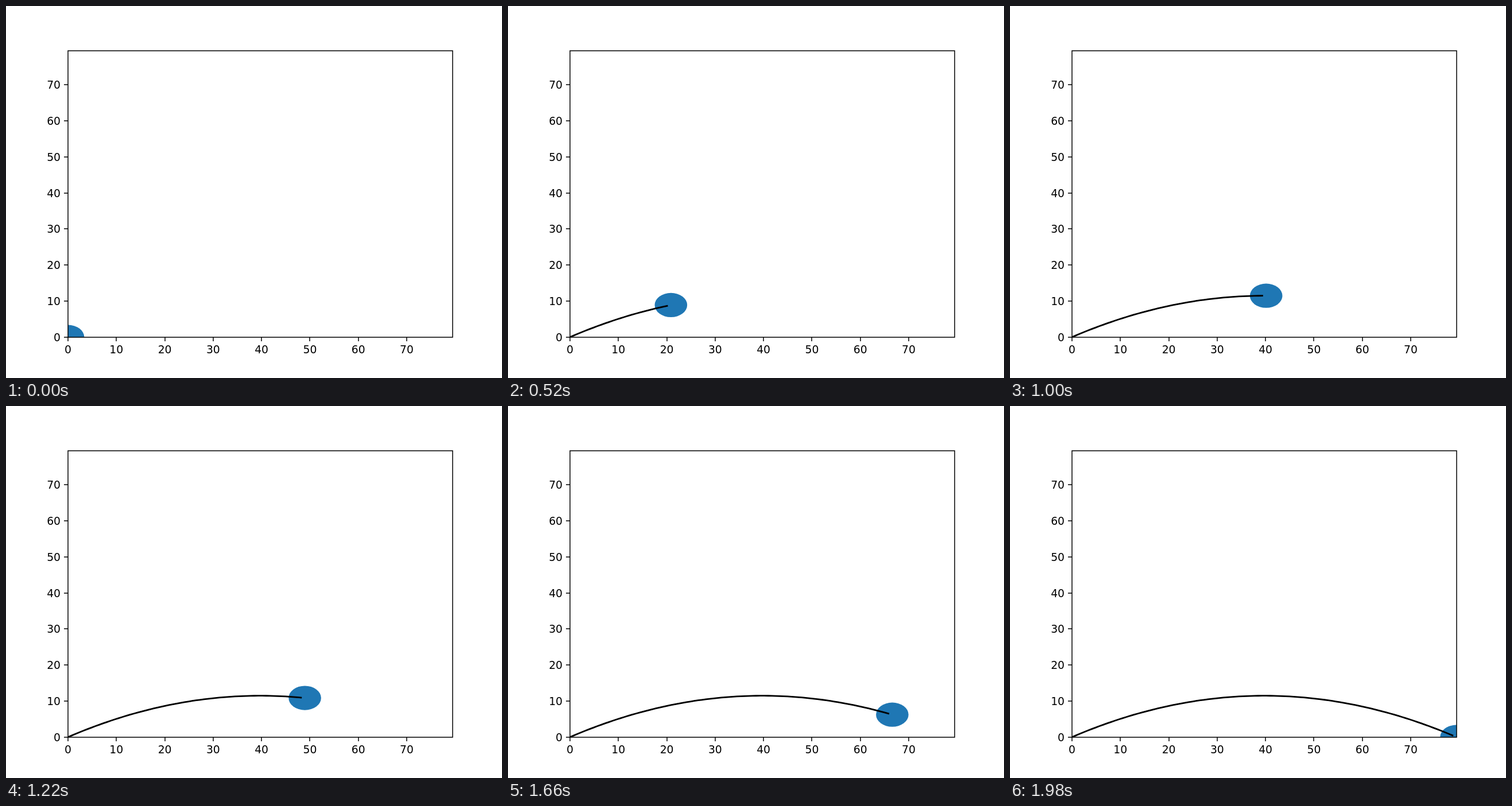
An HTML page for the animation above (2000 ms loop, 864 by 648 pixels).

```html
<!DOCTYPE html>
<html lang="en">
<head>
<meta charset="utf-8">
<title>Projectile motion</title>
<style>
  html, body { margin: 0; width: 100%; height: 100%; overflow: hidden; background: #fff; }
  svg { display: block; }
  text { font: 18.75px "DejaVu Sans", sans-serif; }
  .axis { fill: none; stroke: #000; stroke-width: 1.5; }
  #trail { fill: none; stroke: #000; stroke-width: 2.8; stroke-linecap: square; stroke-linejoin: round; }
</style>
</head>
<body>
<svg width="864" height="648" viewBox="0 0 864 648">
  <clipPath id="plot"><rect x="108" y="78" width="670" height="499"/></clipPath>
  <g clip-path="url(#plot)">
    <ellipse id="ball" rx="28.3" ry="21.1" fill="#1f77b4"/>
    <path id="trail"/>
  </g>
  <rect class="axis" x="108" y="78" width="670" height="499"/>
  <path id="ticks" class="axis"/>
  <g id="labels"></g>
</svg>
<script>
const $ = id => document.getElementById(id);
const ball = $('ball'), trail = $('trail');

// Launch at 30 m/s and 30 degrees; the axes span the range both ways
const speed = 30, angle = Math.PI / 6, gravity = 9.81;
const range = speed ** 2 * Math.sin(2 * angle) / gravity;
const steps = 100, stepMs = 20;

const px = x => 108 + x / range * 669.6;
const py = y => 576.72 - y / range * 498.96;

function position(i) {
  const x = range * i / (steps - 1);
  return [px(x), py(x * Math.tan(angle) * (1 - x / range))];
}

let ticks = '', labels = '';
for (let v = 0; v <= 70; v += 10) {
  const x = Math.round(px(v)), y = Math.round(py(v));
  ticks += `M${x} 577v7M108 ${y}h-7`;
  labels += `<text x="${px(v)}" y="605" text-anchor="middle">${v}</text>` +
            `<text x="95" y="${y + 7}" text-anchor="end">${v}</text>`;
}
$('ticks').setAttribute('d', ticks);
$('labels').innerHTML = labels;

const points = Array.from({ length: steps }, (_, i) => position(i));

function draw() {
  const i = Math.floor(performance.now() / stepMs) % steps;
  const [x, y] = points[i];
  ball.setAttribute('cx', x);
  ball.setAttribute('cy', y);
  // The trail stops one step behind the ball
  trail.setAttribute('d', i > 1 ? 'M' + points.slice(0, i).join('L') : '');
  requestAnimationFrame(draw);
}
draw();
</script>
</body>
</html>
```
